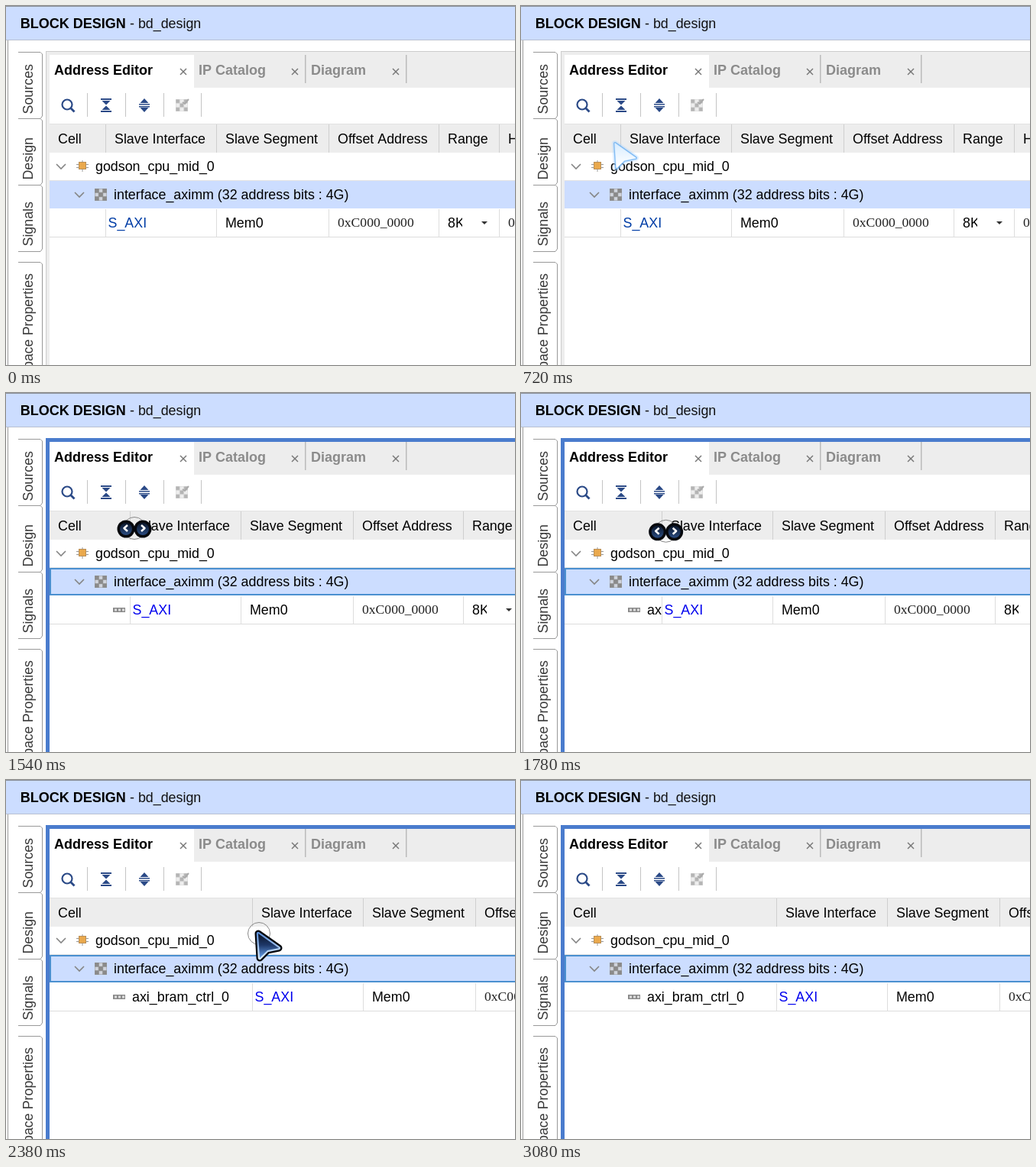
An HTML page with a canvas that plays this animation: 666 px wide and 470 px high, repeating every 3620 ms.

```html
<!DOCTYPE html>
<html lang="en">
<head>
<meta charset="utf-8">
<title>Address Editor</title>
<style>
  html, body { margin: 0; width: 100%; height: 100%; overflow: hidden; background: #fff; }
  canvas { display: block; }
</style>
</head>
<body>
<canvas id="stage" width="666" height="470"></canvas>
<script>
const ctx = document.getElementById('stage').getContext('2d');
const LOOP = 3620, W = 666, H = 470;
const FAMILY = '"Liberation Sans", Arial, sans-serif';
const SANS = '17.85px ' + FAMILY;
const BOLD = 'bold 18px ' + FAMILY;
const SERIF = '17.6px "Liberation Serif", "Times New Roman", serif';
const NAVY = '#2b4a87', GREY = '#ededed', SELECTED = '#ccddff';

const TICKS = [0, 170, 250, 330, 400, 480, 550, 630, 720, 810, 880, 960, 1060,
  1390, 1470, 1540, 1610, 1700, 1790, 1880, 1940, 2040, 2120, 2200, 2290, 2380,
  2450, 2520, 2680, 2760, 2840, 2920, 3000, 3080];

// time, pointer x, pointer y, column divider x
const KEYS = [
  [170, 111, 404, 130], [330, 136, 350, 130], [400, 147, 315, 130],
  [480, 146, 272, 130], [550, 138, 232, 130], [630, 128, 200, 130],
  [720, 124, 180, 130], [810, 132, 170, 130], [1060, 132, 169, 130],
  [1390, 134, 172, 130], [1540, 168, 177, 162], [1880, 214, 185, 208],
  [2040, 257, 193, 256], [2380, 331, 201, 322], [2450, 333, 201, 327],
  [2520, 333, 201, 334], [2680, 322, 208, 334], [3000, 86, 458, 334]
];

function poseAt(t) {
  const next = KEYS.findIndex(key => key[0] > t);
  if (next === 0) return KEYS[0].slice(1);
  if (next < 0) return KEYS[KEYS.length - 1].slice(1);
  const a = KEYS[next - 1], b = KEYS[next];
  const k = (t - a[0]) / (b[0] - a[0]);
  return [1, 2, 3].map(i => a[i] + (b[i] - a[i]) * k);
}

function rect(x, y, w, h, color) {
  ctx.fillStyle = color;
  ctx.fillRect(x, y, w, h);
}

function text(str, x, y, color = '#000', font = SANS) {
  ctx.font = font;
  ctx.fillStyle = color;
  ctx.fillText(str, x, y);
}

function path(points, closed) {
  ctx.beginPath();
  points.forEach(([x, y]) => ctx.lineTo(x, y));
  if (closed) ctx.closePath();
}

function stroke(color, width) {
  ctx.strokeStyle = color;
  ctx.lineWidth = width;
  ctx.stroke();
}

function line(points, color, width = 1) {
  path(points);
  stroke(color, width);
}

function polygon(points, color) {
  path(points, true);
  ctx.fillStyle = color;
  ctx.fill();
}

function circle(x, y, r) {
  ctx.beginPath();
  ctx.arc(x, y, r, 0, 2 * Math.PI);
}

function disc(x, y, r, fill) {
  circle(x, y, r);
  ctx.fillStyle = fill;
  ctx.fill();
}

function ring(x, y, r, color, width) {
  circle(x, y, r);
  stroke(color, width);
}

function clipped(x, y, w, h, draw) {
  ctx.save();
  ctx.beginPath();
  ctx.rect(x, y, w, h);
  ctx.clip();
  draw();
  ctx.restore();
}

function sideTab(label, top, bottom, textTop) {
  line([[16, top + .5], [45, top + .5], [47.5, top + 3], [47.5, bottom - 3], [45, bottom + .5], [16, bottom + .5]], '#999');
  ctx.save();
  ctx.translate(35, textTop);
  ctx.rotate(-Math.PI / 2);
  ctx.textAlign = 'right';
  text(label, 0, 0, '#3a3a3a');
  ctx.restore();
}

function drawFrame() {
  rect(0, 0, W, H, '#fff');
  rect(2, 45, 1, H, '#999');
  rect(0, 0, W, 45, SELECTED);
  rect(0, 0, W, 1, '#8a8f98');
  rect(0, 44, W, 1, '#b8c0d0');
  text('BLOCK DESIGN', 18.7, 29, '#000', BOLD);
  text('- bd_design', 162, 29, '#111');
  sideTab('Sources', 60, 147, 76);
  sideTab('Design', 147, 234, 172);
  sideTab('Signals', 234, 321, 256);
  sideTab('Address Space Properties', 335, 500, 350);
}

function drawTabs(focused) {
  rect(52, 59, W, H, focused ? '#4a7ccd' : GREY);
  if (!focused) {
    rect(52, 59, W, 1, '#ccc');
    rect(52, 59, 1, H, '#ccc');
  }
  rect(57, 64, W, H, '#fff');
  rect(246, 64, W, 43, GREY);
  text('Address Editor', 63, 90, '#000', BOLD);
  text('IP Catalog', 252, 90, '#8b8b8b', BOLD);
  text('Diagram', 399, 90, '#8b8b8b', BOLD);
  for (const x of [391, 523]) rect(x, 64, 1.5, 37, '#bbb');
  for (const x of [232, 378, 510]) {
    line([[x - 4, 82], [x + 4, 90]], '#777', 1.5);
    line([[x + 4, 82], [x - 4, 90]], '#777', 1.5);
  }
}

function triangle(x, base, tip) {
  polygon([[x - 5.5, base], [x + 5.5, base], [x, tip]], NAVY);
}

// Nine cells, every second one lighter.
function drawGrid(x, y, size, dark, light) {
  const step = size / 3;
  for (let i = 0; i < 9; i++) {
    rect(x + i % 3 * step + .5, y + Math.floor(i / 3) * step + .5, step - 1, step - 1, i % 2 ? light : dark);
  }
}

function drawToolbar() {
  for (const x of [106, 156, 206, 255]) rect(x, 114, 1, 31, '#c4c4c4');
  ring(80, 129, 6.5, NAVY, 2.2);
  line([[84.5, 133.5], [89.5, 138.5]], NAVY, 2.8);
  rect(124, 121, 14, 2, NAVY);
  triangle(131, 124, 129.5);
  triangle(131, 136, 130.5);
  rect(124, 137, 14, 2, NAVY);
  triangle(181, 127, 121);
  rect(174, 128, 14, 1.5, NAVY);
  rect(174, 131, 14, 1.5, NAVY);
  triangle(181, 133, 139);
  rect(222, 122, 16, 16, '#d6d6d6');
  drawGrid(222, 122, 16, '#b4b4b4', '#eee');
  line([[231, 126], [234, 128], [239, 122]], '#aaa', 2);
}

function chevron(x, y) {
  line([[x - 6, y - 3], [x, y + 3], [x + 6, y - 3]], '#858585', 1.6);
}

function drawTable(divider, focused) {
  const columns = [0, 145, 292, 436, 515].map(dx => Math.round(divider) + dx);
  const left = columns[0];
  rect(57, 154, W, 38, GREY);
  rect(57, 154, W, 1, '#e2e2e2');
  rect(57, 228, W, 1, '#e4e4e4');
  rect(57, 229, W, 36, SELECTED);
  rect(57, 302, W, 1, '#ddd');
  if (focused) {
    ctx.strokeStyle = '#4a90d0';
    ctx.lineWidth = 2;
    ctx.strokeRect(58, 230, W, 34);
  }

  text('Cell', 68, 180);
  ['Slave Interface', 'Slave Segment', 'Offset Address', 'Range', 'High Address']
    .forEach((title, i) => text(title, columns[i] + 12, 180));
  for (const x of columns) {
    rect(x, 155, 1, 37, '#cfcfcf');
    rect(x, 266, 1, 36, '#ddd');
  }

  chevron(72, 210);
  rect(92, 207, 16, 1, '#999');
  rect(92, 211, 16, 1, '#999');
  rect(99.5, 202, 1, 15, '#999');
  rect(95, 204, 10, 10, '#b98f58');
  rect(96, 205, 8, 8, '#eaa94d');
  text('godson_cpu_mid_0', 117, 216);

  chevron(96, 247);
  rect(116, 239, 16, 16, '#929292');
  drawGrid(116, 239, 16, '#8a8a8a', '#d0d4dc');
  text('interface_aximm (32 address bits : 4G)', 141, 253);

  clipped(57, 266, left - 57, 36, () => {
    rect(140, 281, 16, 6, '#8a8a8a');
    for (const x of [142, 147, 152]) rect(x, 282.5, 3, 3, '#ddd');
    text('axi_bram_ctrl_0', 165, 290);
  });
  text('S_AXI', left + 3.5, 290, focused ? '#0000ee' : '#003da6');
  text('Mem0', columns[1] + 12, 290);
  text('0xC000_0000', columns[2] + 12, 289, '#222', SERIF);
  clipped(columns[3], 266, 31, 36, () => text('8K', columns[3] + 12, 290));
  const arrow = columns[3] + 60;
  polygon([[arrow - 4, 282], [arrow + 4, 282], [arrow, 286]], '#333');
  text('0xC000_1FFF', columns[4] + 12, 289, '#222', SERIF);
}

function gradient(y0, y1, ...colors) {
  const g = ctx.createLinearGradient(0, y0, 0, y1);
  colors.forEach((c, i) => g.addColorStop(i / (colors.length - 1), c));
  return g;
}

function drawArrow(pressed) {
  path([[-1, 0], [26, 19], [11, 22], [1, 32]], true);
  if (pressed) {
    stroke('#05070c', 9);
    stroke(gradient(0, 32, '#5c8fd8', '#dcefff'), 4.5);
    ctx.fillStyle = gradient(0, 30, '#0a1224', '#1d3768', '#5f95dc');
  } else {
    stroke('rgba(165,210,255,.35)', 8);
    stroke('rgba(95,170,240,.75)', 4);
    stroke('#d4eaff', 1.5);
    ctx.fillStyle = gradient(0, 30, '#d9edff', '#fff');
  }
  ctx.fill();
}

function drawResize(pressed) {
  for (const side of [-1, 1]) {
    const x = side * 11;
    if (pressed) {
      disc(x, 1, 11.5, '#05070c');
      disc(x, 1, 8, gradient(-8, 10, '#0a1426', '#2c4f86'));
    } else {
      disc(x, 0, 9, 'rgba(170,212,255,.4)');
      disc(x, 0, 6.5, 'rgba(120,185,245,.65)');
    }
    line([[x - side * 2, -4], [x + side * 2.5, 0], [x - side * 2, 4]], '#fff', 2.5);
  }
}

function drawPointer(x, y, resizing, pressed) {
  ctx.save();
  ctx.translate(x, y);
  ctx.lineJoin = 'round';
  if (pressed) ring(0, 0, 14.5, '#888', 1);
  (resizing ? drawResize : drawArrow)(pressed);
  ctx.restore();
}

function render(time) {
  const t = TICKS.filter(tick => tick <= time).pop();
  const focused = t >= 1390;
  const [x, y, divider] = poseAt(t);
  drawFrame();
  drawTabs(focused);
  drawToolbar();
  drawTable(divider, focused);
  if (t >= 170 && t < 3080) {
    drawPointer(x, y, t >= 810 && t < 1940, focused && t < 2680);
  }
}

const start = performance.now();
function animate(now) {
  render(Math.max(0, now - start) % LOOP);
  requestAnimationFrame(animate);
}
requestAnimationFrame(animate);
</script>
</body>
</html>
```
